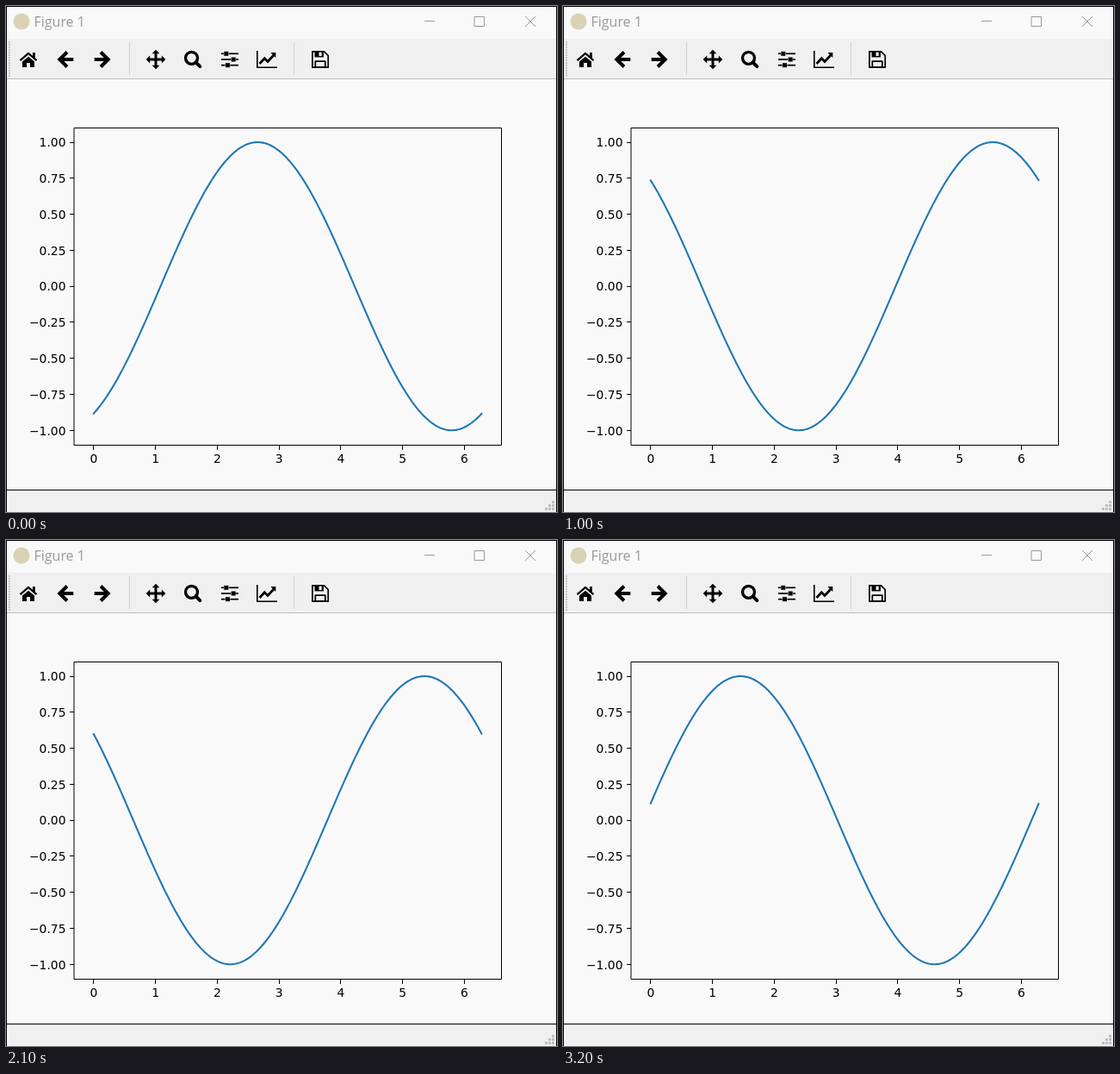
Write an HTML page with a canvas that moves like this. It is 640 by 587 pixels and loops after 3300 ms.

```html
<!DOCTYPE html>
<html lang="en">
<head>
<meta charset="utf-8">
<title>Figure 1</title>
<style>
html, body { margin: 0; width: 100%; height: 100%; overflow: hidden; background: #f9f9f9; }
canvas { display: block; }
</style>
</head>
<body>
<canvas id="stage" width="640" height="587"></canvas>
<script>
const ctx = document.getElementById('stage').getContext('2d');
const PAPER = '#f9f9f9', BAR = '#f0f0f0', GREY = '#999';
const LOOP = 3300, STEP = 100;
const X0 = 101.8, Y0 = 325.1, UNIT = 71.75, AMP = 167.1;

// Animation counter at chosen steps; the sine advances 0.1 rad per count.
const KEYS = [[0, 52], [3, 62], [10, 86], [15, 104], [21, 125], [27, 146], [32, 164]];

function rect(x, y, w, h, color = '#000') {
  ctx.fillStyle = color;
  ctx.fillRect(x, y, w, h);
}

function trace(points) {
  ctx.beginPath();
  points.forEach(([x, y]) => ctx.lineTo(x, y));
}

function poly(points, color = '#000') {
  trace(points);
  ctx.closePath();
  ctx.fillStyle = color;
  ctx.fill();
}

function line(points, width = 1, color = '#000', cap = 'butt', join = 'miter') {
  trace(points);
  ctx.lineWidth = width;
  ctx.strokeStyle = color;
  ctx.lineCap = cap;
  ctx.lineJoin = join;
  ctx.stroke();
}

function text(str, x, y, font, color, align) {
  ctx.font = font;
  ctx.fillStyle = color;
  ctx.textAlign = align;
  ctx.fillText(str, x, y);
}

function drawTitleBar() {
  ctx.beginPath();
  ctx.arc(18, 18, 9.5, 0, 2 * Math.PI);
  ctx.fillStyle = '#d9d2b4';
  ctx.fill();
  text('Figure 1', 32.5, 24, '16px "Open Sans", "Noto Sans", sans-serif', GREY, 'left');
  rect(486, 17, 12, 1, GREY);
  ctx.lineWidth = 1;
  ctx.strokeStyle = GREY;
  ctx.strokeRect(544.5, 12.5, 11, 11);
  line([[603, 12], [615, 24]], 1, GREY);
  line([[615, 12], [603, 24]], 1, GREY);
}

function drawHome() {
  line([[16.5, 63.2], [26, 55], [35.5, 63.2]], 2.2);
  rect(31, 54, 2.8, 6);
  poly([[19, 64.6], [26, 58.7], [33, 64.6], [33, 71], [28, 71], [28, 66],
        [24, 66], [24, 71], [19, 71]]);
}

function drawArrow(x, dir) {
  line([[x - 6 * dir, 62], [x + 9 * dir, 62]], 4);
  line([[x + 1.6 * dir, 53.5], [x - 7 * dir, 62], [x + 1.6 * dir, 70.5]], 4);
}

function drawMove() {
  ctx.save();
  ctx.translate(174, 62);
  for (let i = 0; i < 4; i++) {
    rect(-1.5, -8, 3, 8.5);
    poly([[0, -11.3], [4.4, -6.8], [-4.4, -6.8]]);
    ctx.rotate(Math.PI / 2);
  }
  ctx.restore();
}

function drawSearch() {
  ctx.beginPath();
  ctx.arc(215.5, 60.3, 7, 0, 2 * Math.PI);
  ctx.lineWidth = 3.3;
  ctx.strokeStyle = '#000';
  ctx.stroke();
  line([[220.8, 65.6], [225.3, 70.1]], 4, '#000', 'round');
}

function drawSliders() {
  [[253.3, 55.3], [261.7, 62], [255, 68.7]].forEach(([x, y]) => {
    rect(250, y - 0.85, x - 250.4, 1.7);
    rect(x, y - 2.5, 5, 5);
    rect(x + 5.4, y - 0.85, 264.6 - x, 1.7);
  });
}

function drawChart() {
  line([[291.8, 52], [291.8, 71.2], [315, 71.2]], 1.6);
  line([[294.5, 67], [300.3, 60.8], [304, 64.4], [311, 57]], 2.8);
  poly([[313.3, 54], [313.3, 60], [307.3, 54]]);
}

function drawDisk() {
  line([[355.9, 52.8], [369.5, 52.8], [374.2, 57.5], [374.2, 71.2], [355.9, 71.2], [355.9, 51.9]],
       1.7, '#000', 'butt', 'round');
  rect(358.5, 52.5, 10.4, 6.9);
  rect(363.5, 53.6, 3.2, 4.4, BAR);
  ctx.lineWidth = 1.7;
  ctx.strokeRect(359.3, 64.2, 11.5, 7);
}

function drawToolbar() {
  rect(1, 38, 638, 46, BAR);
  rect(1, 84, 638, 1, '#bdbdbd');
  for (let y = 41; y < 81; y += 3) rect(3, y, 2, 2, '#c4c4c4');
  rect(143, 42, 1, 38, '#d0d0d0');
  rect(334, 42, 1, 38, '#d0d0d0');
  drawHome();
  drawArrow(69.3, 1);
  drawArrow(111.7, -1);
  drawMove();
  drawSearch();
  drawSliders();
  drawChart();
  drawDisk();
}

function drawStatusBar() {
  rect(1, 561, 638, 1);
  rect(1, 562, 638, 25, BAR);
  rect(2, 563, 1, 24, '#fafafa');
  for (let row = 0; row < 3; row++)
    for (let col = 0; col <= row; col++)
      rect(634 - 4 * col, 574 + 4 * row, 3, 3, '#bfbfbf');
}

function drawAxes() {
  const font = '13.89px "DejaVu Sans", sans-serif';
  ctx.lineWidth = 1;
  ctx.strokeStyle = '#000';
  ctx.strokeRect(79.5, 141.5, 496, 368);
  for (let n = 0; n <= 6; n++) {
    const x = X0 + n * UNIT;
    rect(Math.floor(x), 510, 1, 5);
    text(String(n), x, 530, font, '#000', 'center');
  }
  for (let v = -1; v <= 1; v += 0.25) {
    const y = Y0 - v * AMP;
    rect(74, Math.floor(y), 5, 1);
    text((v < 0 ? '\u2212' : '') + Math.abs(v).toFixed(2), 69.5, Math.round(y + 5.3), font, '#000', 'right');
  }
}

function counterAt(step) {
  const i = KEYS.findIndex(([s]) => s >= step);
  if (i === 0) return KEYS[0][1];
  const [s0, c0] = KEYS[i - 1], [s1, c1] = KEYS[i];
  return Math.round(c0 + (c1 - c0) * (step - s0) / (s1 - s0)) % 100;
}

function drawCurve(step) {
  const phase = counterAt(step) / 10;
  const points = [];
  for (let x = 0; x < 2 * Math.PI; x += 0.02)
    points.push([X0 + x * UNIT, Y0 - AMP * Math.sin(x + phase)]);
  line(points, 2.08, '#1f77b4', 'square', 'round');
}

function draw(step) {
  rect(0, 0, 640, 587, PAPER);
  drawTitleBar();
  drawToolbar();
  drawCurve(step);
  drawAxes();
  drawStatusBar();
  rect(0, 0, 640, 1);
  rect(0, 0, 1, 587);
  rect(639, 0, 1, 587);
}

const start = performance.now();
function tick() {
  const t = Math.max(0, performance.now() - start) % LOOP;
  draw(Math.floor(t / STEP));
  requestAnimationFrame(tick);
}
tick();
</script>
</body>
</html>
```
